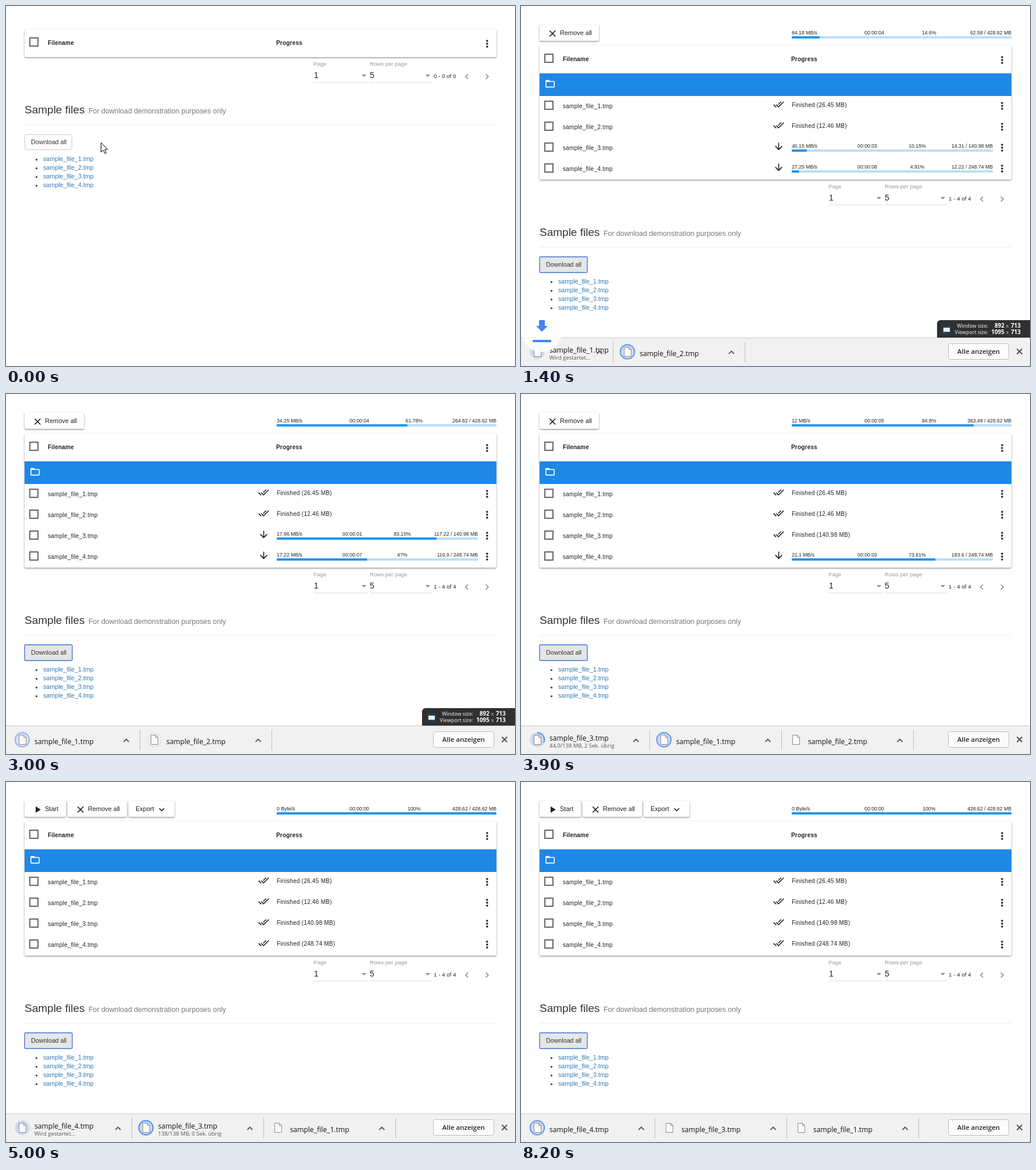
These frames come from a looping animation (876x620 px, 8300 ms). An HTML page with a canvas:

```html
<!DOCTYPE html>
<html lang="en">
<head>
<meta charset="utf-8">
<title>Download manager</title>
<style>
html, body { margin: 0; width: 100%; height: 100%; overflow: hidden; background: #fff; }
canvas { display: block; }
</style>
</head>
<body>
<canvas id="stage" width="876" height="620"></canvas>
<script>
const ctx = document.getElementById('stage').getContext('2d');
const LOOP = 8300, LAYOUT_AT = 800, SHELF_AT = 1000, ALL_DONE = 4700;
const SANS = '"Liberation Sans", Arial, sans-serif';
const UI = '"Open Sans", "Noto Sans", sans-serif';
const BLUE = '#4285f4', DARK = '#212121';

const icons = {
  check: 'M18 7l-1.41-1.41-6.34 6.34 1.41 1.41L18 7zm4.24-1.41L11.66 16.17 7.48 12l-1.41 1.41L11.66 19l12-12-1.42-1.41zM.41 13.41L6 19l1.41-1.41L1.83 12 .41 13.41z',
  down: 'M20 12l-1.41-1.41L13 16.17V4h-2v12.17l-5.58-5.59L4 12l8 8 8-8z',
  folder: 'M20 6h-8l-2-2H4c-1.1 0-2 .9-2 2v12c0 1.1.9 2 2 2h16c1.1 0 2-.9 2-2V8c0-1.1-.9-2-2-2zm0 12H4V8h16v10z',
  close: 'M19 6.41L17.59 5 12 10.59 6.41 5 5 6.41 10.59 12 5 17.59 6.41 19 12 13.41 17.59 19 19 17.59 13.41 12z',
  play: 'M8 5v14l11-7z',
  more: 'M16.59 8.59L12 13.17 7.41 8.59 6 10l6 6 6-6z',
  left: 'M15.41 7.41L14 6l-6 6 6 6 1.41-1.41L10.83 12z',
  right: 'M10 6L8.59 7.41 13.17 12l-4.58 4.59L10 18l6-6z'
};
for (const k in icons) icons[k] = new Path2D(icons[k]);

// Curves are [time, value] points joined by straight lines.
const total = {
  size: 428.62,
  done: [[800, 0], [1400, 62.58], [3000, 264.82], [3900, 363.48], [ALL_DONE, 428.62]],
  speed: [[800, 30], [1400, 84.18], [3000, 34.25], [3900, 12]],
  left: [[800, 6], [1400, 4], [3000, 4], [3900, 5], [ALL_DONE, 0]]
};
const rows = [
  { size: 26.45, done: [[800, 0], [1200, 26.45]], speed: [[800, 22]], left: [[800, 1]] },
  { size: 12.46, done: [[800, 0], [1000, 12.46]], speed: [[800, 18]], left: [[800, 1]] },
  { size: 140.98, done: [[1100, 0], [1400, 14.31], [3000, 117.22], [3400, 140.98]],
    speed: [[800, 30], [1400, 40.15], [3000, 17.96]], left: [[800, 4], [1400, 3], [3000, 1]] },
  { size: 248.74, done: [[1100, 0], [1400, 12.22], [3000, 116.9], [3900, 183.6], [ALL_DONE, 248.74]],
    speed: [[800, 20], [1400, 27.25], [3000, 17.22], [3900, 21.1]],
    left: [[800, 9], [1400, 8], [3000, 7], [3900, 3], [ALL_DONE, 0]] }
];
// Shelf entries, newest first.
const shelf = [
  { id: 4, start: 4700, done: 7900, size: 243, curve: [[5200, 0], [6300, 93.1], [7800, 243]] },
  { id: 3, start: 3580, done: 5300, size: 138, curve: [[3600, 0], [3900, 44], [5000, 138]] },
  { id: 1, start: 1225, done: 1560 },
  { id: 2, start: 1000, done: 1100 }
];

function at(points, t) {
  if (t <= points[0][0]) return points[0][1];
  for (let i = 1; i < points.length; i++) {
    const [t0, a] = points[i - 1], [t1, b] = points[i];
    if (t <= t1) return a + (b - a) * (t - t0) / (t1 - t0);
  }
  return points[points.length - 1][1];
}
const short = v => String(+v.toFixed(2));

function text(s, x, y, font, color = DARK, align = 'left', spacing = 0) {
  ctx.font = font;
  ctx.letterSpacing = spacing + 'px';
  ctx.textAlign = align;
  ctx.fillStyle = color;
  ctx.fillText(s, x, y);
}
const sans = (s, x, y, size, color, align, spacing) =>
  text(s, x, y, size + 'px ' + SANS, color, align, spacing);

function rect(x, y, w, h, color) {
  ctx.fillStyle = color;
  ctx.fillRect(x, y, w, h);
}
function box(x, y, w, h, r, fill, stroke, width = 1) {
  ctx.beginPath();
  ctx.roundRect(x, y, w, h, r);
  ctx.fillStyle = fill;
  ctx.fill();
  if (!stroke) return;
  ctx.strokeStyle = stroke;
  ctx.lineWidth = width;
  ctx.stroke();
}
function dot(x, y, r, color) {
  ctx.beginPath();
  ctx.arc(x, y, r, 0, 7);
  ctx.fillStyle = color;
  ctx.fill();
}
function line(points, color, width) {
  ctx.beginPath();
  points.forEach(p => ctx.lineTo(...p));
  ctx.strokeStyle = color;
  ctx.lineWidth = width;
  ctx.stroke();
}
function poly(points, color) {
  ctx.beginPath();
  points.forEach(p => ctx.lineTo(...p));
  ctx.closePath();
  ctx.fillStyle = color;
  ctx.fill();
}
function icon(name, cx, cy, color = DARK, scale = 0.8) {
  ctx.save();
  ctx.translate(cx - 12 * scale, cy - 12 * scale);
  ctx.scale(scale, scale);
  ctx.fillStyle = color;
  ctx.fill(icons[name]);
  ctx.restore();
}
function raised(x, y, w, h) {
  ctx.save();
  ctx.shadowColor = 'rgba(0,0,0,.45)';
  ctx.shadowBlur = 3;
  ctx.shadowOffsetY = 1.3;
  box(x, y, w, h, 2, '#fff');
  ctx.restore();
}
function checkbox(y) {
  ctx.strokeStyle = '#666';
  ctx.lineWidth = 2;
  ctx.strokeRect(41, y + 1, 14, 14);
}
function menuDots(y) {
  for (const d of [-5, 0, 5]) dot(828, y + d, 1.8, DARK);
}

function progress(item, t, x1, y, timeX, pctX) {
  const done = at(item.done, t), over = done >= item.size;
  const label = (s, x, align) => sans(s, x, y, 8.7, DARK, align);
  label(over ? '0 Byte/s' : short(at(item.speed, t)) + ' MB/s', 466);
  label('00:00:' + String(Math.round(at(item.left, t))).padStart(2, '0'), timeX, 'center');
  label(short(done / item.size * 100) + '%', pctX, 'center');
  label(short(done) + ' / ' + item.size + ' MB', x1, 'right');
  rect(466, y + 3, x1 - 466, 4, '#bbdefb');
  rect(466, y + 3, (x1 - 466) * at(item.done, t - 80) / item.size, 4, '#2196f3');
}

function toolbar(t) {
  const finished = t >= ALL_DONE, x = finished ? 74 : 0;
  if (finished) {
    raised(32, 32, 71, 28);
    icon('play', 54.2, 47.5);
    sans('Start', 67, 50, 11);
    raised(211, 32, 79, 28);
    sans('Export', 223, 50, 11);
    icon('more', 268, 47.5);
  }
  raised(32 + x, 32, 102, 28);
  icon('close', 54.3 + x, 47.5);
  sans('Remove all', 67 + x, 50, 11);
  progress(total, t, 844, 49, 608, 702.3);
}

function table(t, active) {
  const top = active ? 68 : 40;
  raised(32, top, 812, active ? 231 : 48);
  checkbox(top + 14);
  for (const [s, x] of [['Filename', 72], ['Progress', 465]])
    text(s, x, top + 27, 'bold 10px ' + SANS, DARK, 'left', 0.2);
  menuDots(top + 25);
  if (!active) return;
  rect(32, 116, 812, 39, '#1e88e5');
  icon('folder', 50, 134, '#fff');
  rows.forEach((row, i) => {
    const y = 155 + 36 * i, over = at(row.done, t) >= row.size;
    checkbox(y + 8);
    sans(`sample_file_${i + 1}.tmp`, 72, y + 21, 10, DARK, 'left', 0.28);
    menuDots(y + 17);
    icon(over ? 'check' : 'down', 443.5, y + (over ? 14.3 : 15));
    if (over) sans(`Finished (${row.size} MB)`, 466, y + 19, 10, DARK, 'left', 0.25);
    else progress(row, t, 812, y + 17, 596, 682);
  });
}

function select(label, value, x, x1, arrowX) {
  sans(label, x, 103, 9.6, '#9a9a9a');
  sans(value, x + (x < 600 ? 1 : 0), 124, 14);
  rect(x, 131, x1 - x, 1, '#ddd');
  poly([[arrowX - 4, 118], [arrowX + 4, 118], [arrowX, 122]], '#8c8c8c');
}

function lowerPage(t, active) {
  ctx.save();
  if (active) ctx.translate(0, 211);
  select('Page', '1', 529, 623, 616);
  select('Rows per page', '5', 626, 733, 726);
  sans(active ? '1 - 4 of 4' : '0 - 0 of 0', 736, 124, 9.8);
  icon('left', 793, 121.5, '#8c8c8c');
  icon('right', 828, 121.5, '#8c8c8c');

  sans('Sample files', 32, 185, 19, '#333');
  sans('For download demonstration purposes only', 142, 185, 12.35, '#777');
  rect(32, 204, 812, 1, '#eee');
  if (active) box(32, 221, 82, 27, 2, '#e6e6e6', '#6d94d8', 1.8);
  else box(32.5, 221.5, 81, 26, 3, t >= 500 ? '#e6e6e6' : '#fff', t >= 500 ? '#adadad' : '#ccc');
  sans('Download all', 43, 238, 10.7, '#333');
  for (let i = 0; i < 4; i++) {
    dot(52.5, 264.5 + 15 * i, 1.6, '#333');
    sans(`sample_file_${i + 1}.tmp`, 64, 267 + 15 * i, 10.7, '#337ab7');
  }
  ctx.restore();
}

function pointer(t) {
  const x = at([[200, 163], [600, 92]], t), y = at([[200, 235], [600, 240]], t);
  const shape = [[0, 0], [0, 16], [3.8, 12.6], [6.6, 18.6], [9, 17.6], [6.3, 11.6], [11.4, 11.4]];
  const pts = shape.map(([a, b]) => [x + 0.5 + a, y + 0.5 + b]);
  poly(pts, '#fff');
  line([...pts, pts[0]], '#000', 1);
}

function page(x, y) {
  poly([[x, y], [x + 8, y], [x + 12, y + 4], [x + 12, y + 16], [x, y + 16]], '#fbfbfb');
  line([[x + 8, y], [x + 8, y + 4], [x + 12, y + 4], [x + 12, y + 16], [x, y + 16],
    [x, y], [x + 8, y], [x + 12, y + 4]], '#8a8a8a', 1);
}
function ring(x, amount, alpha) {
  ctx.save();
  ctx.globalAlpha = alpha;
  dot(x, 595.5, 12.5, 'rgba(66,133,244,.22)');
  ctx.beginPath();
  ctx.arc(x, 595.5, 12.2, -Math.PI / 2, (amount * 2 - 0.5) * Math.PI);
  ctx.strokeStyle = BLUE;
  ctx.lineWidth = 1.9;
  if (amount) ctx.stroke();
  ctx.restore();
}

function shelfItem(item, x, w, t) {
  const done = t >= item.done, name = `sample_file_${item.id}.tmp`;
  const got = item.curve ? at(item.curve, t) : 0;
  if (!done) ring(x + 28, item.size ? got / item.size : 0, 1);
  else if (t - item.done < 2600)
    ring(x + 28, 1, 0.5 + 0.5 * Math.cos((t - item.done) / 340 * 2 * Math.PI));
  page(x + 22.5, 587.5);
  text(name, x + 49, done ? 603 : 597, '12.1px ' + UI, '#111');
  if (!done) {
    let status = 'Wird gestartet...';
    if (got && t >= item.curve[0][0] + 100) {
      const amount = got < 100 ? got.toFixed(1).replace('.', ',') : Math.round(got);
      const end = item.curve[2][0];
      status = `${amount}/${item.size} MB, ${Math.max(0, Math.round((end - t) / 520))} Sek. übrig`;
    }
    text(status, x + 49, 609, '9.5px ' + UI, '#555');
  }
  const cx = x + w - 20;
  line([[cx - 4.5, 599], [cx, 594.5], [cx + 4.5, 599]], '#555', 1.8);
  rect(Math.round(x + w + 3), 578, 1, 36, '#bdbdbd');
}

function startBadge(t) {
  const y = 562 - (t - 1400) * 0.1;
  ctx.save();
  ctx.globalAlpha = Math.sin((t - 1200) / 400 * Math.PI);
  dot(36, y, 34, 'rgba(255,255,255,.87)');
  rect(31, y - 21, 10, 10, BLUE);
  poly([[26, y - 11], [46, y - 11], [36, y - 1]], BLUE);
  rect(20, y + 13, 32, 4, BLUE);
  ctx.restore();
}

function sizeOverlay() {
  box(716, 541, 160, 30, [6, 0, 0, 0], '#303030');
  rect(725, 551, 15, 13, '#25435f');
  rect(727, 554, 11, 7, '#eaf3fa');
  [['Window size:', '892', 554], ['Viewport size:', '1095', 565]].forEach(([label, w, y]) => {
    text(label, 804, y, '600 8.6px ' + UI, '#ccc', 'right');
    text('713', 860, y, '700 10px ' + UI, '#fff', 'right');
    text('x', 837, y, '9px ' + UI, '#ccc', 'center');
    text(w, 832, y, '700 10px ' + UI, '#fff', 'right');
  });
}

function downloadBar(t) {
  rect(0, 571, 876, 49, '#f1f1f1');
  rect(0, 571, 876, 1, '#c8c8c8');
  let x = 0;
  shelf.filter(item => t >= item.start).slice(0, 3).forEach(item => {
    const k = Math.min(1, (t - item.start) / 400);
    const w = 227 * (1 - (1 - k) ** 2);
    shelfItem(item, x, w, t);
    x += w;
  });
  box(735.5, 581.5, 104, 27, 3, '#fcfcfc', '#bdbdbd');
  text('Alle anzeigen', 787.5, 599, '600 11.5px ' + UI, '#222', 'center');
  line([[853.5, 590.5], [862.5, 599.5]], '#555', 2);
  line([[862.5, 590.5], [853.5, 599.5]], '#555', 2);
  if (t > 1200 && t < 1600) startBadge(t);
  if (t < 3200) sizeOverlay();
}

function draw(t) {
  const active = t >= LAYOUT_AT;
  rect(0, 0, 876, 620, '#fff');
  if (active) toolbar(t);
  table(t, active);
  lowerPage(t, active);
  if (!active) pointer(t);
  if (t >= SHELF_AT) downloadBar(t);
}

let origin;
function tick(now) {
  origin ??= now;
  draw(Math.floor((now - origin) % LOOP / 100) * 100);
  requestAnimationFrame(tick);
}
draw(0);
requestAnimationFrame(tick);
</script>
</body>
</html>
```
